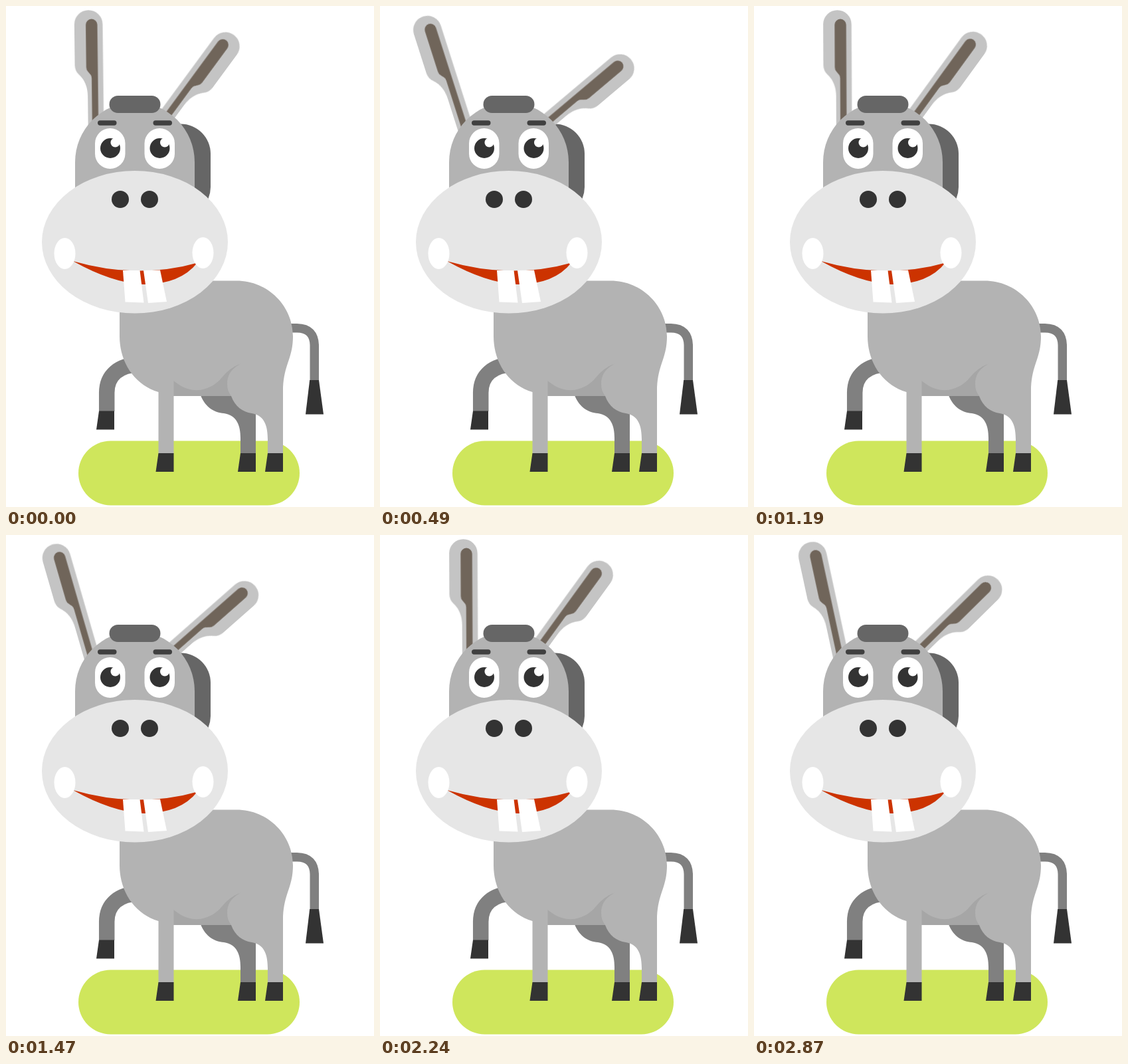
An HTML page for the animation above (2.94 s loop, 554 by 754 pixels).

```html
<!DOCTYPE html>
<html lang="en">
<head>
<meta charset="utf-8">
<title>Donkey</title>
<style>
  html, body { margin: 0; width: 100%; height: 100%; overflow: hidden; background: #fff; }
  svg { display: block; width: 100%; height: 100%; }
  #leftEar { transform-origin: 126px 208px; }
  #rightEar { transform-origin: 206px 208px; }
  .coat { fill: #b3b3b3; }
  .shade { fill: #808080; }
  .limb { fill: none; stroke: #808080; }
  .mane { fill: #666; }
  .dark { fill: #333; }
  .white { fill: #fff; }
</style>
</head>
<body>
<svg viewBox="0 0 554 754">
  <defs>
    <g id="ear">
      <path fill="#c4c4c4" d="M147.6 27.5A21.3 21.3 0 0 0 105 27.5V89Q105.3 98 111 103Q124 115 124 136V200H147.6Z"/>
      <path fill="#70655a" d="M139.6 28.3A8.7 8.7 0 0 0 122.2 28.3V92Q122.3 96 124.5 98.5L129 104Q130.2 106 130.2 109V200H139.6Z"/>
    </g>
    <g id="eye">
      <rect class="white" x="134" y="184" width="45.5" height="61" rx="22.7"/>
      <circle class="dark" cx="157" cy="214" r="15"/>
      <circle class="white" cx="164.5" cy="205.5" r="7"/>
    </g>
    <path id="hoof" class="dark" d="M0 0H23V28H-4Z"/>
  </defs>

  <rect x="109" y="654.5" width="333" height="97" rx="48.5" fill="#cfe65c"/>

  <!-- tail and far legs -->
  <path class="limb" stroke-width="13.5" d="M420 484.7H438Q464.3 485 464.3 512V564"/>
  <path class="dark" d="M457.2 563H471L478 614.5H451Z"/>
  <path class="limb" stroke-width="23.5" d="M200 540C170 540 151.7 556 151.7 582V610"/>
  <use href="#hoof" x="140" y="609.5"/>
  <path class="shade" d="M293 586C300 604 314 612 328 613C348 616 353 632 353 650V674H376V586Z"/>
  <use href="#hoof" x="353" y="673"/>

  <!-- body and near legs -->
  <path class="coat" d="M171 413.5H347C395 413.5 432 452 432 497C432 532 417 540 417 580V674H394V652C394 630 388 616 370 613C356 611 345 603 339 587H252.5V674H229.5V581C193 570 171 536 171 497Z"/>
  <path fill="#a6a6a6" d="M252.5 564C285 592 315 572 325 559Q337 544 353 538.5C338 547 333 556 333 569Q333 579 339 587H252.5Z"/>
  <use href="#hoof" x="229.5" y="673"/>
  <use href="#hoof" x="394" y="673"/>

  <!-- head -->
  <rect class="mane" x="200" y="177.5" width="108" height="140" rx="45"/>
  <use id="leftEar" href="#ear"/>
  <g id="rightEar">
    <use href="#ear" transform="translate(329 59.5) rotate(35.8) scale(-1 1) translate(-126.3 -27.5)"/>
  </g>
  <path class="coat" d="M104 235A90 90 0 0 1 284 235V320H104Z"/>
  <rect class="mane" x="155.5" y="135" width="77" height="26" rx="13"/>
  <rect x="138" y="172.3" width="28.5" height="7.4" rx="3.7" fill="#404040"/>
  <rect x="221.5" y="172.3" width="28.5" height="7.4" rx="3.7" fill="#404040"/>
  <use href="#eye"/>
  <use href="#eye" x="74.5"/>

  <!-- muzzle -->
  <ellipse cx="194" cy="355.3" rx="140" ry="107.3" fill="#e6e6e6"/>
  <circle class="dark" cx="172" cy="291" r="13"/>
  <circle class="dark" cx="216" cy="291" r="13"/>
  <path fill="#cc3300" d="M101 384Q150 398 195 398.5Q245 399 288 386.5Q262 419 207 419Q160 417 101 384Z"/>
  <path class="white" d="M176 398H201.5L207.5 446.5L179.5 445.5Z"/>
  <path class="white" d="M207 398L232 397.5L242 445L214 447Z"/>
  <ellipse class="white" cx="88.5" cy="372.5" rx="16" ry="23.5"/>
  <ellipse class="white" cx="296.5" cy="371.5" rx="16" ry="23.5"/>
</svg>
<script>
  const LOOP = 2940, STEP = 70, SWING = 1050, UPRIGHT_AT = 126;

  function swing(id, degrees) {
    const angles = [0, degrees, 0];
    const animation = document.getElementById(id).animate(
      angles.map(a => ({ transform: `rotate(${a}deg)`, easing: 'ease' })),
      { duration: SWING, iterations: Infinity });
    animation.pause();
    return animation;
  }

  const ears = [swing('leftEar', -18.9), swing('rightEar', 15)];
  const start = performance.now();

  function draw() {
    const elapsed = (performance.now() - start) % LOOP;
    const time = Math.floor(elapsed / STEP) * STEP;
    for (const ear of ears) ear.currentTime = time + SWING - UPRIGHT_AT;
    requestAnimationFrame(draw);
  }
  draw();
</script>
</body>
</html>
```
